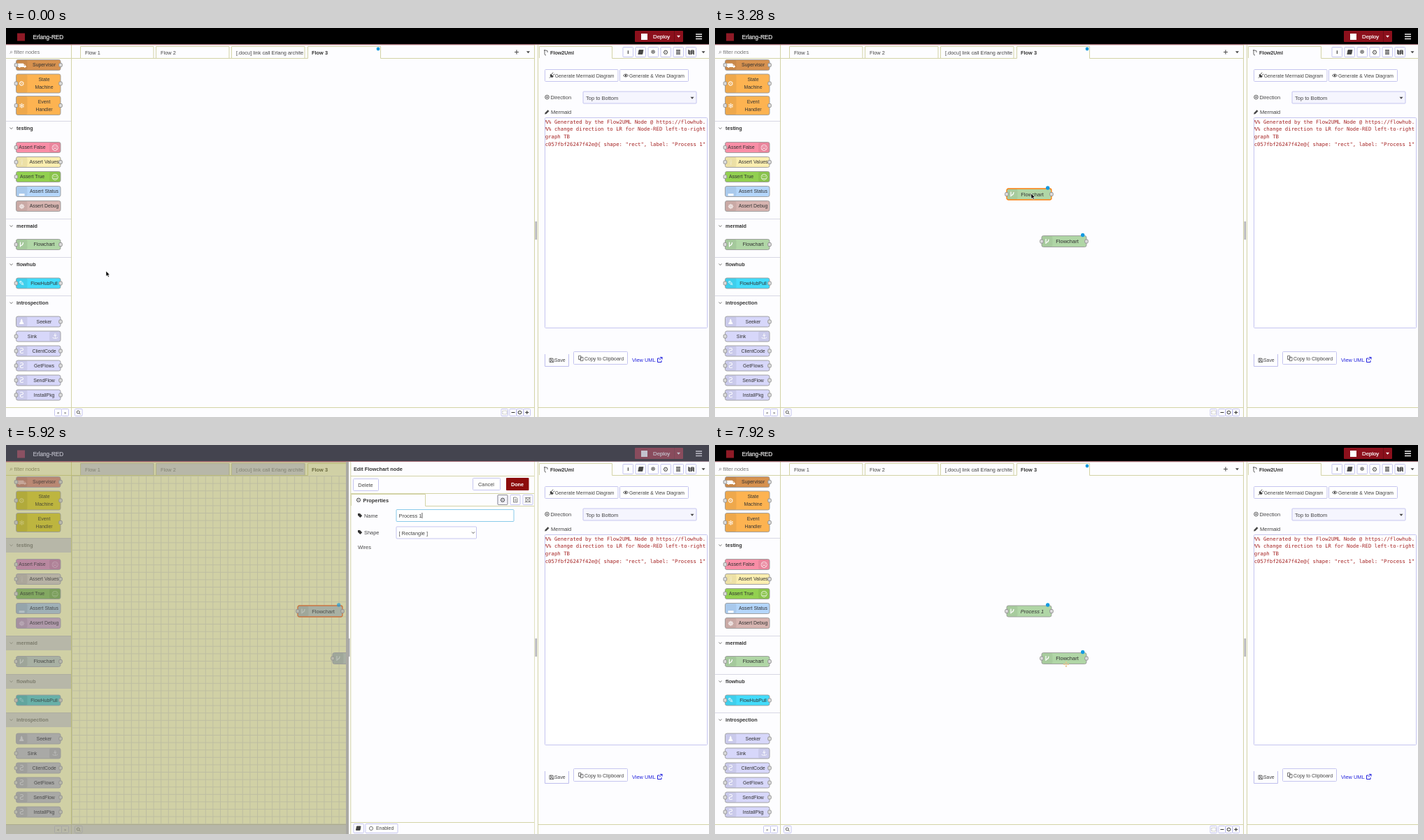
An HTML page that plays this animation: 1005x557 px, repeating every 8000 ms.

```html
<!DOCTYPE html>
<html>
<head>
<meta charset="utf-8">
<style>
html, body { margin: 0; width: 100%; height: 100%; overflow: hidden; background: #fdfdff; }
svg { display: block; width: 1005px; height: 557px; }
text { font-family: "Liberation Sans", Arial, sans-serif; white-space: pre; }
.icon { font-family: "DejaVu Sans", sans-serif; text-anchor: middle; }
.mono { font-family: "DejaVu Sans Mono", monospace; }
.box { fill: var(--lit); }
.dimmed .box { fill: var(--dim); }
.dimmed .port { fill: #b9b9ac; }
.dimmed .glyph { opacity: .3; }
.dimmed .dot { opacity: .65; }
.dimmed .label { opacity: .8; }
</style>
</head>
<body>
<svg id="stage" viewBox="0 0 1005 557"></svg>
<script>
const LINE = '#d3d3a6', LILAC = '#bfbfee', INK = '#444', BG = '#fdfdff';
// Node colours: normal, dimmed
const GREEN = ['#b0d6a6', '#a8b0a3'], LAVENDER = ['#d7d7fa', '#a9a9a6'], ORANGE = ['#fdb351', '#bdb53f'];

// All y values of text and icons are vertical centres.
const rect = (x, y, w, h, fill = 'none', stroke = 'none', r = 0, extra = '') =>
  `<rect x="${x}" y="${y}" width="${w}" height="${h}" fill="${fill}" stroke="${stroke}" stroke-width=".9" rx="${r}" ${extra}/>`;
const text = (x, y, s, size = 7.4, fill = INK, extra = '') =>
  `<text x="${x}" y="${y + size * .36}" font-size="${size}" fill="${fill}" ${extra}>${s}</text>`;
const bold = (x, y, s, size = 7.3, fill = '#333', extra = '') => text(x, y, s, size, fill, 'font-weight="bold" ' + extra);
const mid = (x, y, s, size, fill, extra = '') => text(x, y, s, size, fill, 'text-anchor="middle" ' + extra);
const icon = (x, y, s, size = 9, fill = INK) => text(x, y, s, size, fill, 'class="icon"');
const path = (d, stroke = LINE, width = 1, extra = 'fill="none"') =>
  `<path d="${d}" stroke="${stroke}" stroke-width="${width}" ${extra}/>`;
const dot = (x, y, r = 2.7, fill = '#149be0') => `<circle cx="${x}" cy="${y}" r="${r}" fill="${fill}"/>`;
const group = (id, body, extra = '') => `<g id="${id}" ${extra}>${body}</g>`;
const button = (x, y, w, h) => rect(x, y, w, h, '#fff', LILAC, 1);
const port = (x, y) => rect(x - 2.3, y - 2.5, 4.6, 5, '#dcdcdc', '#8f8f8f', 1.3, 'class="port"');
const nodeBox = (x, y, w, h, [lit, dim]) =>
  rect(x, y, w, h, lit, '#999', 2.5, `class="box" style="--lit:${lit};--dim:${dim}"`);
const glyph = body => `<g class="glyph">${body}</g>`;
const fork = (x, y) => path(`M${x - 2} ${y - 3.5}v7m0 -1.5q4 -1 4 -5`, '#fff', 1.2);
const down = (x, y, fill = '#444') => path(`M${x - 2.5} ${y - 1.2}h5l-2.5 3z`, 'none', 0, `fill="${fill}"`);

function paletteNode([y, label, colors, sign, ports, h = 15, right]) {
  const lines = label.split('\n');
  const labelX = right ? 37.5 : 54.5, iconX = right ? 70 : 22.5;
  return nodeBox(14.5, y - h / 2, 63.5, h, colors) +
    rect(right ? 62 : 15, y - h / 2 + .5, 15.5, h - 1, '#000', 'none', 2, 'opacity=".06"') +
    glyph(sign === 'fork' ? fork(iconX, y) : icon(iconX, y, sign, 10, '#fff')) +
    lines.map((s, i) => mid(labelX, y + (i - (lines.length - 1) / 2) * 11, s, 6.9, '#333', 'class="label"')).join('') +
    (ports.includes('l') ? port(14.5, y) : '') + (ports.includes('r') ? port(78, y) : '');
}

const flowNode = (id, x, y) => group(id,
  nodeBox(0, 0, 64, 16, GREEN) +
  rect(.5, .5, 15, 15, '#000', 'none', 2, 'opacity=".05"') + glyph(fork(8, 8)) +
  mid(36.5, 8, 'Flowchart', 7.5, '#333', 'class="label"') + port(0, 8) + port(64, 8) +
  `<g class="dot">${dot(58.7, -1)}</g>`, `transform="translate(${x} ${y})"`);

const palette = [
  [53, 'Supervisor', ['#d6914f', '#b98873'], '⛟', 'lr'],
  [79.5, 'State\nMachine', ORANGE, '⚙', 'lr', 27],
  [111, 'Event\nHandler', ORANGE, '❄', 'lr', 27],
  [171, 'Assert False', ['#f98ea6', '#b988a0'], '☹', 'l', 15, true],
  [192, 'Assert Values', ['#fbeeb0', '#b6b1a4'], '❕', 'lr'],
  [213, 'Assert True', ['#92d050', '#83a862'], '☺', 'l', 15, true],
  [234, 'Assert Status', ['#b4d6fb', '#9fb0b6'], '▂', ''],
  [255, 'Assert Debug', ['#d6b4b0', '#b09aaa'], '☸', ''],
  [310, 'Flowchart', GREEN, 'fork', 'lr'],
  [365.5, 'FlowHubPull', ['#43dcfb', '#68b0a8'], '✎', 'lr'],
  [420.5, 'Seeker', LAVENDER, '♟', 'r'],
  [441.5, 'Sink', LAVENDER, '⚓', 'l', 15, true],
  ...['ClientCode', 'GetFlows', 'SendFlow', 'InstallPkg']
    .map((s, i) => [462.5 + i * 21, s, LAVENDER, 'Ƨ', 'lr']),
];
const categories = [[133, 'testing'], [273, 'mermaid'], [328, 'flowhub'], [383, 'introspection']];
const tabs = [[106.5, 'Flow 1'], [214.5, 'Flow 2'], [322.5, '[.docu] link call Erlang archite']];

const app =
  rect(0, 24, 1005, 533, BG) +
  categories.map(([y, s]) => path(`M0 ${y + .5}H93`, '#d8d8e4') +
    path(`M5.5 ${y + 9.5}l2 2.2l2 -2.2`, '#666', .9) + bold(15, y + 10.5, s, 7.2)).join('') +
  icon(7.5, 34, '⌕', 9, '#777') + text(11.5, 34.5, 'filter nodes', 7.5, '#777') +
  path('M0 43.5H431.5V26.5H535.5V43.5H755.5M93.5 24V557M0 543.5H755.5') +
  tabs.map(([x, s]) => path(`M${x} 43.5V26.5H${x + 104.5}V43.5`) +
    text(x + 6.5, 35, s)).join('') +
  bold(437, 35, 'Flow 3', 7.4) + dot(532, 30, 2.4) +
  path('M727 34.5h6M730 31.5v6', '#555', 1.2) + down(746.5, 34.5) +
  button(69.5, 545.5, 10, 10) + button(79.5, 545.5, 10, 10) + icon(74.5, 550.5, '«', 6) + icon(84.5, 550.5, '»', 6) +
  button(98.5, 545.5, 10.5, 10) +
  `<circle cx="103.2" cy="550" r="2" fill="none" stroke="#444" stroke-width=".9"/>` + path('M104.6 551.4l1.8 1.8', '#444') +
  [708, 720, 730, 740].map(x => button(x, 545.5, 9.5, 10)).join('') +
  rect(710, 548, 6, 5, 'none', '#999', 0, 'stroke-dasharray="1"') +
  path('M722.5 550.5h5M742.3 550.5h5M744.8 548v5', '#333', 1.1) +
  `<circle cx="734.5" cy="550.5" r="2.3" fill="none" stroke="#333"/>`;

const nodes = palette.map(paletteNode).join('') + flowNode('first', 417, 230) + flowNode('second', 467, 297.5);

const header =
  rect(0, 0, 1005, 23.5, '#000') + rect(0, 23.3, 1005, 1, '#a8606a') +
  rect(16, 7.5, 11, 11, '#8f1a26') +
  text(38.5, 13, 'Erlang-RED', 8.2, '#eee', 'stroke="#eee" stroke-width=".2"') +
  rect(899, 4, 69, 16, '#8c101c', 'none', 1) + rect(908, 8, 9, 9, '#fff') +
  text(925, 12, 'Deploy', 7.8, '#fff', 'stroke="#fff" stroke-width=".2"') +
  path('M955.5 4v16', '#6d0c15') + down(961.5, 12, '#fff') +
  path('M986 9h9M986 12.3h9M986 15.6h9', '#eee', 1.5);

const shade = 'rgba(148,148,172,.42)';
const dim =
  `<pattern id="grid" x="94" y="44" width="10.6" height="10.6" patternUnits="userSpaceOnUse">
    <path d="M0 .5H10.6M.5 0V10.6" stroke="rgba(140,140,150,.28)" fill="none"/></pattern>` +
  rect(0, 24, 756, 533, 'rgba(164,164,76,.5)') + rect(94, 44, 654, 499, 'url(#grid)') +
  rect(0, 0, 1005, 24, 'rgba(136,136,158,.5)') + rect(0, 23.3, 756, 1, '#a8606a') +
  categories.map(([y]) => rect(0, y, 93, 21, shade)).join('') +
  tabs.map(([x]) => rect(x, 26, 105, 17, shade)).join('') +
  rect(0, 543, 756, 14, shade) + rect(748, 24, 8, 519, shade);

const separator = rect(755.5, 24.3, 5, 533, BG) + path('M755.5 24V557') + rect(756.5, 277, 2.6, 26, '#b5b5b8');

const tag = (x, y) => path(`M${x - 3} ${y - 3}h3l3.2 3.2l-2.8 2.8l-3.4 -3.2z`, 'none', 0, 'fill="#333"');
const tray =
  rect(-4, 24, 4, 533, '#aaa9a4') + rect(0, 24, 265.3, 533, BG) + path('M2.8 24V557M2.8 44.5H265M2.8 69.5H265M2.8 540.5H265') +
  rect(-1, 277, 2.5, 26, '#aaa') + bold(7, 34.5, 'Edit Flowchart node') +
  button(6.5, 48.5, 36, 17) + mid(24, 57, 'Delete') +
  button(177.5, 47.5, 39, 17) + mid(196.5, 56.5, 'Cancel') +
  rect(225, 47, 32.5, 18, '#8c0c0c', 'none', 1) + bold(241, 56.5, 'Done', 7.3, '#fff', 'text-anchor="middle"') +
  path('M3.5 87V70.5H109.5V87.5H265') + icon(14, 79, '⚙', 9) + bold(20.5, 79, 'Properties', 7.4) +
  [220, 238, 256].map(x => button(x - 7, 71.5, 14, 14)).join('') +
  rect(213, 71.5, 14, 14, '#f3f3fb', '#888', 1) + icon(220, 78.5, '⚙', 9) +
  path('M235.5 75h4l1.5 1.5v5.5h-5.5zM236.8 78h3M236.8 80h3M253 75.5h6v6h-6zM252 74.5l8 8M260 74.5l-8 8', '#666', .8) +
  tag(16, 101) + text(22, 101, 'Name') + tag(16, 125) + text(22, 125, 'Shape') + text(13, 146, 'Wires') +
  rect(68, 92.5, 168, 17, '#fff', LILAC, 1, 'id="field"') + text(71.5, 101.5, 'Name', 7.4, '#999', 'id="typed"') +
  path('M0 97v8', '#333', .8, 'id="caret"') +
  button(68, 117, 114.5, 17) + text(71.5, 126, '[ Rectangle ]') + path('M176 124.5l2 2l2 -2', '#444', .9) +
  button(7, 542.5, 14.5, 13) + path('M11.5 546h5.5l-1 5.5h-5.5z', '#444', 1, 'fill="#444"') +
  button(24, 542.5, 46, 13) + `<circle cx="32" cy="549" r="2.6" fill="none" stroke="#555" stroke-width=".8"/>` +
  text(39, 549, 'Enabled', 6.9);

const code = [
  '%% Generated by the Flow2UML Node @ https://flowhub.',
  '%% change direction to LR for Node-RED left-to-right',
  'graph TB',
  'c057fbf26247f42e@{ shape: "rect", label: "Process 1"',
];
const eye = path('M882.5 68q3.5 -4 7 0q-3.5 4 -7 0z', '#444', .9) + dot(886, 68, 1.2, '#444');
const plug = path('M777 71.5l2.2 -2.2M780.2 65.8l2 -2M782.2 67.8l2 -2', '#444', 1) +
  path('M779 66l3.6 3.6q-2 2 -3.8 .2t.2 -3.8z', '#444', .6, 'fill="#444"');
const pencil = path('M770.5 123.2l.6 -2l3.6 -3.6l1.5 1.5l-3.6 3.6z', '#444', .5, 'fill="#444"');
const sidebar =
  rect(760, 24.3, 245, 533, BG) + path('M760.5 24V557') +
  path('M762.5 43V26.5H866.5V43.5H1005M760.5 543.5H1005') +
  path('M769 32h3M770 31v6q0 2 2 2M772 32q3 0 2 3', '#555', .9) + bold(778, 35, 'Flow2Uml', 7.2) +
  [0, 1, 2, 3, 4, 5].map(i => button(882 + i * 18, 27.5, 14.5, 14)).join('') +
  bold(888.3, 34.5, 'i', 8) + path('M905 31.5h6l-1.2 6h-6z', '#444', .8, 'fill="#444"') +
  icon(925, 34.5, '☸', 8) + icon(943, 34.5, '⚙', 9) +
  path('M958 32h6M958 34.5h6M958 37h6', '#444', 1.7) +
  path('M975.5 31.5l2.3 1v5.5l-2.3 -1zM979 32.5l2 -1v5.5l-2 1zM982 31.5l1.5 1v5.5l-1.5 -1z', '#444', .7, 'fill="#666"') +
  down(997, 34.5) +
  button(770.5, 59.5, 104.5, 17) + plug + text(784.7, 68.5, 'Generate Mermaid Diagram', 6.85) +
  button(877.5, 59.5, 98, 17) + eye + text(891, 68.5, 'Generate &amp; View Diagram', 6.8) +
  `<circle cx="773.5" cy="99" r="2.8" fill="none" stroke="#444" stroke-width=".9"/>` + dot(773.5, 99, 1.1, '#444') +
  text(778.5, 99, 'Direction', 7.5) +
  rect(825, 91, 162, 17, '#f5f5fe', LILAC, 1) + text(829, 100, 'Top to Bottom', 7.5) + down(981, 100) +
  pencil + text(779, 120, 'Mermaid', 7.5) +
  rect(770.5, 128.5, 232, 301, '#fff', LILAC, 1) +
  code.map((s, i) => text(770.7, 134 + i * 10.8, s, 7.34, '#a52323', 'class="mono"')).join('') +
  path('M770.5 467V484.5H804.5V467', LILAC) +
  path('M777 473h4.5l1.5 1.5v4h-6zM778.5 473v2h2.5v-2M778.5 478.5v-2h3v2', '#555', .8) + text(784, 476, 'Save', 6.9) +
  button(811.5, 463.5, 77, 18) + path('M818.5 469.5h3.5v5h-3.5zM821 471.5h4v5h-4z', '#555', .8) + text(827, 473, 'Copy to Clipboard', 7) +
  text(895, 475.5, 'View UML', 7.4, '#2222dd') + path('M934.5 473h-3v5.5h5.5v-2.5M934 475.5l4 -4m-3 0h3v3', '#2222dd', 1);

const status = rect(-1, 547.5, 139, 11, '#f4f4f6', '#999', 2) +
  text(1.5, 552.5, 'renderbox:9090/node-red#editor-tab-properties', 6.1, '#333');

const cross = 'M-3 0h6M0 -3v6M-3.8 0l1.2 -1v2zM3.8 0l-1.2 -1v2zM0 -3.8l-1 1.2h2zM0 3.8l-1 -1.2h2z';
const cursors =
  group('arrow', path('M0 0v7.5l1.8 -1.6l1.3 2.8l1.3 -.6l-1.3 -2.7h2.3z', '#fff', .6, 'fill="#000"')) +
  group('ring', `<circle r="11.8" fill="#fff" stroke="#222"/>` + path(cross, '#111', 1)) +
  group('move', path(cross, 'currentColor', .8, 'fill="currentColor"'));

const stage = document.getElementById('stage');
stage.innerHTML = app + header + group('dim', dim) + group('nodes', nodes) + separator +
  group('tray', tray) + sidebar + group('status', status) + flowNode('helper', 0, 0) + cursors;

const el = id => document.getElementById(id);
const show = (node, on) => node.style.display = on ? '' : 'none';
const within = (t, a, b) => t >= a && t < b;
const ease = p => .5 - Math.cos(Math.PI * Math.min(1, Math.max(0, p))) / 2;
const place = (node, x, y) => node.setAttribute('transform', `translate(${x} ${y})`);

// Pointer stops: time, x, y
const stops = [
  [160, 143, 348], [640, 48, 311], [720, 48, 311], [1200, 404, 241], [1360, 404, 241],
  [1680, 48, 311], [1760, 48, 311], [2240, 542, 306], [2560, 454, 308.5], [2640, 454, 308.5],
  [2960, 452, 237], [3600, 452, 237], [4160, 577, 111], [4400, 590, 101],
  [6080, 590, 101], [6560, 731, 56], [6800, 731, 56], [7120, 506, 313], [7600, 502, 314],
];
function pointer(t) {
  const i = stops.findIndex(s => s[0] > t);
  if (i < 0) return stops[stops.length - 1].slice(1);
  if (i === 0) return stops[0].slice(1);
  const [a, x0, y0] = stops[i - 1], [b, x1, y1] = stops[i];
  const p = ease((t - a) / (b - a));
  return [x0 + (x1 - x0) * p, y0 + (y1 - y0) * p];
}

function styleNode(id, selected, changed, outline = '#ff7f0e') {
  const box = el(id).querySelector('.box');
  box.setAttribute('stroke', selected ? outline : '#999');
  box.setAttribute('stroke-width', selected ? 1.3 : .9);
  show(el(id).querySelector('.dot'), changed);
}

const NAME = 'Process 1';
function draw(now) {
  const t = Math.floor(now % 8000 / 80) * 80;
  const [x, y] = pointer(t);
  const dragging = within(t, 720, 1360) || within(t, 1760, 2640);
  const dimmed = within(t, 3440, 7200);
  const moving = t >= 7040;
  const renamed = t >= 7200;

  show(el('first'), t >= 1360);
  show(el('second'), t >= 2640);
  styleNode('first', t < 2640 || within(t, 2960, 7360), true, dimmed ? '#cc7440' : undefined);
  styleNode('second', t < 2960, true);
  const label = el('first').querySelector('text');
  label.textContent = renamed ? NAME : 'Flowchart';
  label.setAttribute('font-style', renamed ? 'italic' : 'normal');

  show(el('helper'), dragging);
  styleNode('helper', true, false, '#d9605a');
  place(el('helper'), x + 13, y - 11);

  show(el('dim'), dimmed);
  el('nodes').classList.toggle('dimmed', dimmed);
  const open = ease((t - 3520) / 280) - ease((t - 6880) / 263);
  show(el('tray'), open > 0.001);
  place(el('tray'), 756 - 266 * open, 0);

  const count = Math.max(0, Math.min(NAME.length, Math.floor((t - 4640) / 130)));
  const typed = el('typed'), caret = el('caret');
  typed.textContent = count ? NAME.slice(0, count) : 'Name';
  typed.setAttribute('fill', count ? INK : '#999');
  el('field').setAttribute('stroke', t >= 4400 ? '#7cc4e8' : LILAC);
  show(caret, t >= 4400);
  place(caret, 72 + (count ? typed.getComputedTextLength() : 0), 0);
  show(el('status'), within(t, 3920, 4480));

  show(el('arrow'), !dragging && !moving && !within(t, 4640, 6080));
  show(el('ring'), dragging);
  show(el('move'), moving);
  el('move').style.color = t >= 7600 ? '#e8c48c' : '#111';
  for (const id of ['arrow', 'ring', 'move']) place(el(id), x, y);
}

function tick() {
  draw(performance.now());
  requestAnimationFrame(tick);
}
tick();
</script>
</body>
</html>
```
